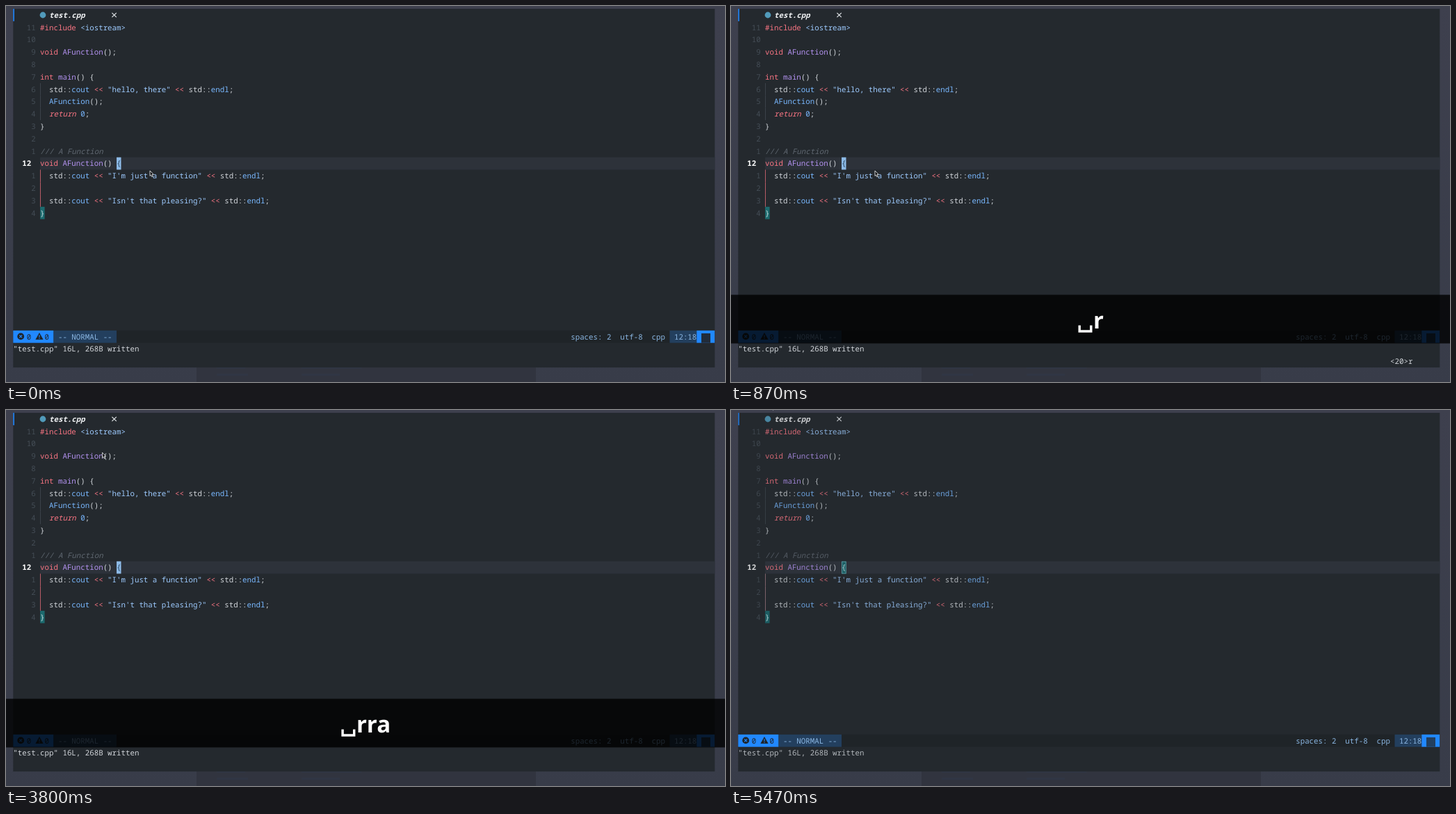
An HTML page with a canvas for the animation above (5540 ms loop, 1034 by 541 pixels).

```html
<!DOCTYPE html>
<html lang="en">
<head>
<meta charset="utf-8">
<title>Editor session</title>
<style>
html, body { margin: 0; width: 100%; height: 100%; overflow: hidden; background: #3b3e4b; }
canvas { display: block; }
</style>
</head>
<body>
<canvas id="stage" width="1034" height="541"></canvas>
<script>
const ctx = document.getElementById('stage').getContext('2d');
const LOOP = 5540, LEFT = 10.3, TOP = 4.1, CW = 6.467, RH = 17.8;
const MONO = '"Source Code Pro", "Noto Sans Mono", "DejaVu Sans Mono", monospace';
const BG = '#24292e', BAR = '#1f2428', BLUE = '#2188ff';
const COLORS = {
  w: '#d1d5da', r: '#f97583', i: '#f97583', p: '#b392f0', b: '#79b8ff',
  s: '#9ecbff', c: '#5f6770', n: '#444d56', h: '#ffffff'
};

// "~x" switches to the colour x; i and c are also italic
const CODE = [
  '~r#include ~s<iostream>',
  '',
  '~rvoid ~pAFunction~w();',
  '',
  '~rint ~pmain~w() {',
  '  std::~bcout ~r<< ~s"hello, there" ~r<< ~wstd::~bendl~w;',
  '  ~bAFunction~w();',
  '  ~ireturn ~b0~w;',
  '}',
  '',
  '~c/// A Function',
  '~rvoid ~pAFunction~w() {',
  '  std::~bcout ~r<< ~s"I\'m just a function" ~r<< ~wstd::~bendl~w;',
  '',
  '  std::~bcout ~r<< ~s"Isn\'t that pleasing?" ~r<< ~wstd::~bendl~w;',
  '}'
];
const CURRENT = 11;

const OUTPUT = ['hello, there', "I'm just a function", "Isn't that pleasing?", '', '[Process exited 0]'];

// time, x, y of the pointer tip
const POINTER = [
  [3533, 206.5, 236.5], [3600, 200, 220], [3667, 182, 170], [3733, 158, 108],
  [3800, 139, 62], [3933, 118, 33], [4130, 101, 15], [4200, 99, 14],
  [4330, 83, 3], [4530, 57, -8.6], [4670, 57, -9.2]
];

ctx.textRendering = 'geometricPrecision';
ctx.font = `100px ${MONO}`;
const SIZE = 100 * CW / ctx.measureText('0').width;

const colX = c => LEFT + c * CW;
const rowY = r => TOP + r * RH;
const between = (t, a, b) => t >= a && t < b;

function rect(x, y, w, h, color) {
  ctx.fillStyle = color;
  ctx.fillRect(x, y, w, h);
}

function cells(row, col, count, color) {
  rect(colX(col), rowY(row), count * CW, RH, color);
}

function line(points, color, width = 1) {
  ctx.beginPath();
  points.forEach(([x, y]) => ctx.lineTo(x, y));
  ctx.strokeStyle = color;
  ctx.lineWidth = width;
  ctx.stroke();
}

function text(row, col, str, color = COLORS.w, style = '') {
  ctx.font = `${style} ${SIZE}px ${MONO}`;
  ctx.fillStyle = color;
  [...str].forEach((ch, k) => ctx.fillText(ch, colX(col + k), rowY(row) + 12.6));
}

function markup(row, col, str) {
  ('~w' + str).split('~').slice(1).forEach(part => {
    const key = part[0], run = part.slice(1);
    text(row, col, run, COLORS[key], 'ic'.includes(key) ? 'italic' : '');
    col += run.length;
  });
}

function desktop() {
  const g = ctx.createLinearGradient(0, 0, 0, 541);
  g.addColorStop(0, '#3e404e');
  g.addColorStop(1, '#383c49');
  rect(0, 0, 1034, 541, g);
  rect(274, 520, 488, 21, '#31343f');
  for (const [x, y, w] of [[303, 519, 41], [425, 519, 86], [303, 529, 45], [425, 529, 55]])
    rect(x, y, w, 3, 'rgba(45,66,96,.15)');
  rect(10.3, 4.1, 1009, 516, BG);
}

function tab(active, settling) {
  if (active) cells(0, 0, .25, BLUE);
  if (settling) rect(10, 17, 1.5, 5, BLUE);
  ctx.fillStyle = '#519aba';
  ctx.beginPath();
  ctx.arc(53, 13, 4.4, 0, 7);
  ctx.fill();
  text(0, 8, 'test.cpp', active ? '#f0f2f4' : COLORS.w, active ? 'italic bold' : '');
  line([[152.4, 9.8], [158.8, 16.2]], '#e1e4e8', 1.2);
  line([[158.8, 9.8], [152.4, 16.2]], '#e1e4e8', 1.2);
}

function code(first, guide, broken) {
  for (let k = first; k < CODE.length; k++) {
    const row = k - first + 1, gap = Math.abs(k - CURRENT);
    if (gap) text(row, gap > 9 ? 3 : 4, String(gap), COLORS.n);
    else text(row, 2, '12', COLORS.h, 'bold');
    if (between(k, 5, 8)) rect(49, rowY(row), 1, RH, '#3b424a');
    if (between(k, 12, 15) && !(broken && k === 13)) rect(49, rowY(row), 1, RH, guide);
    markup(row, 6, CODE[k]);
  }
}

function braces(on, hollow) {
  const teal = '#1c6a6e';
  cells(16, 6, 1, teal);
  text(16, 6, '}', '#c9dfe2');
  cells(12, 23, 1, on ? '#8dbbe8' : teal);
  text(12, 23, '{', on ? '#24405c' : '#c9dfe2');
  if (hollow) {
    ctx.strokeStyle = '#5f9da6';
    ctx.lineWidth = 1;
    ctx.strokeRect(159.5, 218.3, 5.8, 16.8);
  }
}

function status(terminal, dark) {
  const main = terminal ? '#f0a010' : BLUE;
  const side = terminal ? '#4d3f28' : '#233f5e';
  const ink = terminal ? '#b5a78f' : '#8ab6e2';
  const mode = terminal ? '-- TERMINAL --' : '-- NORMAL --';
  cells(26, 0, 156, BAR);
  cells(26, 0, 9, main);
  cells(26, 9, mode.length + 2, side);
  text(26, 10, mode, ink);

  ctx.fillStyle = BAR;
  ctx.beginPath();
  ctx.arc(21.2, 475.4, 4.9, 0, 7);
  ctx.fill();
  line([[19.3, 473.5], [23.1, 477.3]], main, 1.2);
  line([[23.1, 473.5], [19.3, 477.3]], main, 1.2);
  ctx.beginPath();
  [[48, 470], [53.6, 480], [42.4, 480]].forEach(p => ctx.lineTo(...p));
  ctx.fill();
  line([[48, 473.2], [48, 476.8]], main, 1.2);
  line([[48, 477.8], [48, 479]], main, 1.2);
  text(26, 3, '0', BAR);
  text(26, 7, '0', BAR);

  text(26, terminal ? 129 : 124, 'spaces: 2', ink);
  text(26, terminal ? 140 : 135, 'utf-8', ink);
  if (!terminal) text(26, 142, 'cpp', ink);
  const place = terminal ? '1:1' : '12:18';
  cells(26, 151 - place.length, place.length + 1, side);
  text(26, 152 - place.length - (terminal ? 1 : 0), place, ink);
  cells(26, 152, 4, main);
  if (terminal) rect(1000, 481, 13, 2, side);
  else rect(1000, 471, 13, 13.7, dark ? '#212c3a' : side);
}

function terminal(done) {
  cells(13, 0, 156, BAR);
  text(13, 1, 'test.cpp', '#59616a');
  text(13, 150, '12:18', '#59616a');
  if (done) OUTPUT.forEach((s, k) => text(14 + k, 2, s));
  cells(done ? 18 : 14, done ? 20 : 2, 1, '#c8ccd1');
}

function keys(letters, underlined) {
  rect(0, 415.5, 1034, 70, 'rgba(0,0,0,.8)');
  ctx.font = 'bold 33px "Noto Sans", "Open Sans", sans-serif';
  const space = 23, width = ctx.measureText(letters).width;
  const x = 517 - (space + width) / 2;
  line([[x + 3.2, 459.5], [x + 3.2, 468], [x + 19.8, 468], [x + 19.8, 459.5]], '#fff', 3.4);
  ctx.fillStyle = '#fff';
  ctx.fillText(letters, x + space, 463.7);
  if (underlined) {
    const last = letters ? ctx.measureText(letters.slice(-1)).width : space;
    rect(x + space + width - last, 466, last, 2, '#fff');
  }
}

function pointer(time) {
  const t = Math.floor(time / 66.6) * 66.6 + 10;
  let k = POINTER.findIndex(p => p[0] > t);
  if (k < 0) k = POINTER.length;
  const a = POINTER[Math.max(k - 1, 0)], b = POINTER[Math.min(k, POINTER.length - 1)];
  const f = a === b ? 0 : (t - a[0]) / (b[0] - a[0]);
  ctx.save();
  ctx.translate(a[1] + (b[1] - a[1]) * f, a[2] + (b[2] - a[2]) * f);
  ctx.beginPath();
  [[.5, .5], [.5, 8], [2.1, 6.6], [3.3, 9.3], [4.6, 8.7], [3.5, 6], [5.6, 5.8]]
    .forEach(p => ctx.lineTo(...p));
  ctx.closePath();
  ctx.fillStyle = '#111';
  ctx.fill();
  ctx.strokeStyle = '#dfe2e6';
  ctx.lineWidth = .9;
  ctx.stroke();
  ctx.restore();
}

function draw(t) {
  const inTerm = between(t, 1200, 2730), settling = between(t, 2730, 2800);
  const unfocused = t >= 5270;
  const cursorOn = t < 70 || between(t, 400, 1200) || between(t, 2730, 3400) || between(t, 3730, 4870);
  desktop();
  cells(inTerm ? 8 : 12, 6, 150, '#2d323a');

  ctx.globalAlpha = t >= 5330 ? .82 : unfocused ? .91 : 1;
  tab(!inTerm && !settling, settling);
  code(inTerm ? 4 : 0, inTerm ? '#858b92' : unfocused ? '#927078' : '#b85c67', inTerm || settling);
  if (inTerm) terminal(t >= 1400);
  else braces(cursorOn, unfocused);
  text(27, 0, '"test.cpp" 16L, 268B written');
  ctx.globalAlpha = 1;

  if (between(t, 400, 1200)) text(28, 145, t < 670 ? '<20>' : '<20>r');
  status(inTerm, t < 400);
  pointer(t);
  if (between(t, 400, 5470)) {
    const typed = t < 670 ? '' : t < 1200 ? 'r' : t < 2730 ? 'rr' : 'rra';
    const fresh = [[400, 530], [670, 870], [1200, 1530], [2730, 2930]].some(([a, b]) => between(t, a, b));
    keys(typed, fresh);
  }
}

function tick() {
  draw(performance.now() % LOOP);
  requestAnimationFrame(tick);
}
tick();
</script>
</body>
</html>
```
